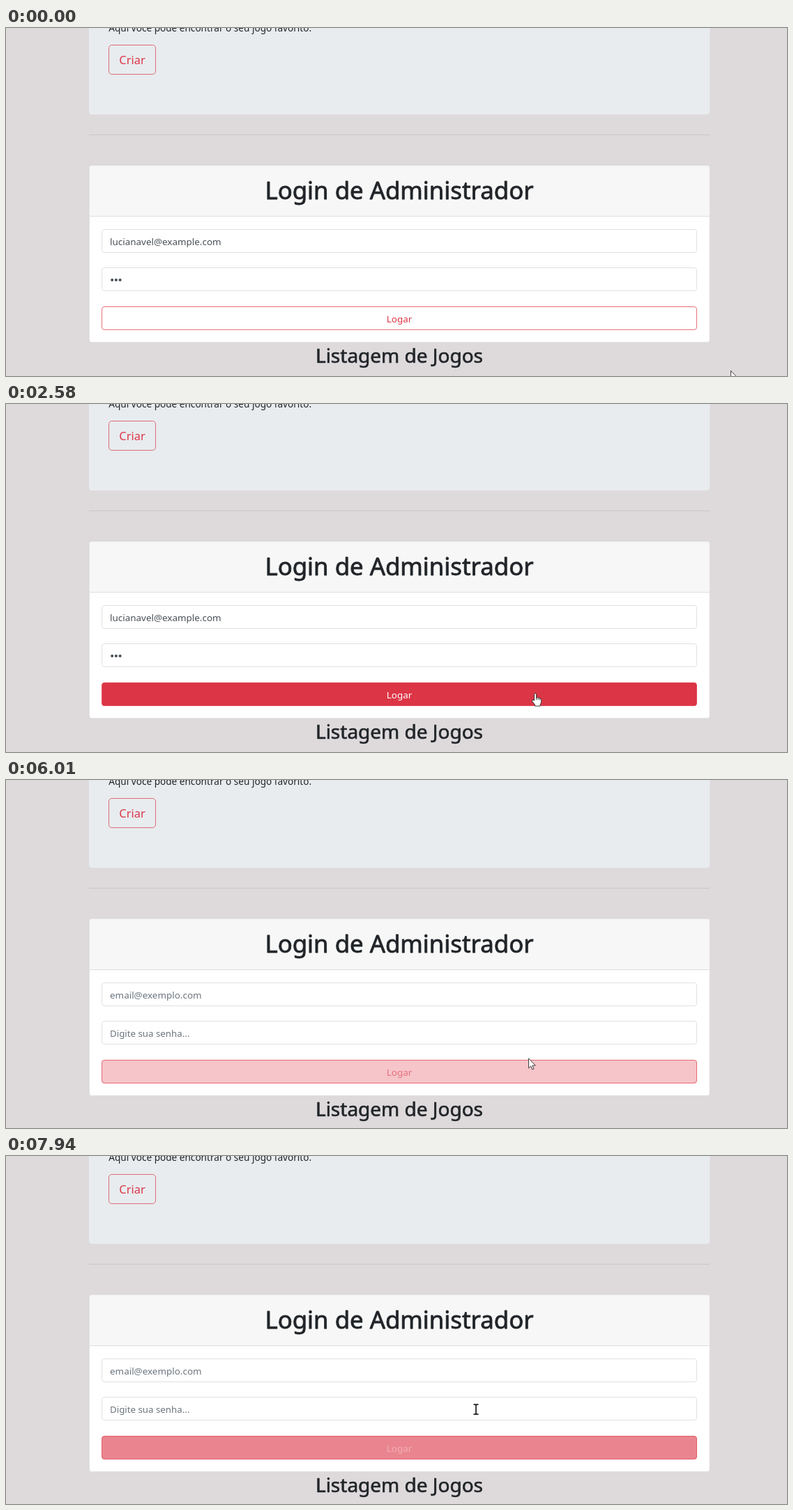
An HTML page with a canvas that plays this animation: 1120x500 px, repeating every 8000 ms.

```html
<!DOCTYPE html>
<html lang="pt-BR">
<head>
<meta charset="utf-8">
<title>Login de Administrador</title>
<style>
html, body { margin: 0; width: 100%; height: 100%; overflow: hidden; background: #dedadb; }
canvas { display: block; width: 1120px; height: 500px; }
</style>
</head>
<body>
<canvas id="stage" width="1120" height="500"></canvas>
<script>
const ctx = document.getElementById('stage').getContext('2d');
const LOOP = 8000, RELOAD = 5150;
const FONT = '"Noto Sans", "Open Sans", sans-serif';
const INK = '#212529', RED = '#dc3545';

const HAND = new Path2D('M-1.5 10.5V1.2Q0-.6 1.5 1.2V6.5Q3 5.5 4 7Q5.5 6 6.5 7.6Q8.5 7 8.6 9V12Q8.5 14.5 7 16.5V18.5H-.5V16.5L-4.6 11.6Q-5 9.5-3 9.8Z');
const FINGERS = new Path2D('M1.5 6.5V9.5M4 7V9.8M6.5 7.6V10');
const ARROW = new Path2D('M0 0V14L3.2 11L5.3 16L7.4 15.1L5.3 10.2H9.7Z');
const IBEAM = new Path2D('M-3.5-7H-1Q0-7 0-6Q0-7 1-7H3.5M0-6V6M-3.5 7H-1Q0 7 0 6Q0 7 1 7H3.5');

// Cursor hot spot: time, x, y
const CURSOR = [
  [70, 1039.5, 492.5], [480, 983, 475], [1090, 983, 475], [1260, 976, 471],
  [1570, 976, 471], [1940, 759, 415.5], [4600, 759, 415.5], [4760, 749, 417.5],
  [5770, 749, 417.5], [6010, 749.5, 400], [6320, 750, 386], [6690, 750, 386],
  [7240, 741.5, 415.5], [7540, 741.5, 415.5], [7725, 722, 401], [7940, 674, 364]
];

const clamp = v => Math.max(0, Math.min(1, v));
const lerp = (a, b, k) => a + (b - a) * k;
const easeInOut = k => k * k * (3 - 2 * k);
const fade = (t, start, end) => easeInOut(clamp((t - start) / (end - start)));

function cursorAt(t) {
  const next = CURSOR.findIndex(key => key[0] > t);
  if (next === 0) return CURSOR[0].slice(1);
  if (next < 0) return CURSOR[CURSOR.length - 1].slice(1);
  const a = CURSOR[next - 1], b = CURSOR[next];
  const k = (t - a[0]) / (b[0] - a[0]);
  return [lerp(a[1], b[1], k), lerp(a[2], b[2], k)];
}

function hoverAt(t) {
  if (t < RELOAD) return fade(t, 1805, 2305);
  if (t < 5960) return 0.32 * fade(t, 5770, 5960);
  if (t < 6600) return 0.32 * (1 - fade(t, 5960, 6220));
  return fade(t, 6985, 7485) * (1 - fade(t, 7725, 8225));
}

function box(x, y, w, h, r, fill, stroke, width = 0.7) {
  ctx.beginPath();
  ctx.roundRect(x, y, w, h, r);
  if (fill) { ctx.fillStyle = fill; ctx.fill(); }
  if (stroke) { ctx.strokeStyle = stroke; ctx.lineWidth = width; ctx.stroke(); }
}

function text(str, x, y, size, color, align = 'left', weight = 0) {
  ctx.font = `${size}px ${FONT}`;
  ctx.textAlign = align;
  ctx.fillStyle = color;
  ctx.fillText(str, x, y);
  if (weight) {
    ctx.lineJoin = 'round';
    ctx.lineWidth = weight;
    ctx.strokeStyle = color;
    ctx.strokeText(str, x, y);
  }
}

function drawFields(filled) {
  box(137.5, 289.5, 853, 33, 3.6, '#fff', '#ced4da');
  box(137.5, 344.5, 853, 33, 3.6, '#fff', '#ced4da');
  if (!filled) {
    text('email@exemplo.com', 149, 312, 13.45, '#6c757d');
    text('Digite sua senha...', 149, 367, 13.3, '#6c757d');
    return;
  }
  text('lucianavel@example.com', 149, 312, 13.45, '#495057');
  ctx.fillStyle = '#495057';
  for (let i = 0; i < 3; i++) {
    ctx.beginPath();
    ctx.arc(152.2 + i * 5.7, 362, 2.1, 0, Math.PI * 2);
    ctx.fill();
  }
}

function drawSubmit(hover, ring) {
  if (ring) box(135.6, 398.6, 856.8, 36.8, 5, null, `rgba(220,53,69,${0.5 * ring})`, 2.9);
  box(137.5, 400.5, 853, 33, 3.6, `rgba(220,53,69,${hover})`, RED);
  const mix = [220, 53, 69].map(c => Math.round(lerp(c, 255, hover)));
  text('Logar', 564, 423, 13.4, `rgb(${mix})`, 'center');
}

function drawPage(t) {
  box(119, -40, 890.3, 164.3, 4.3, '#e8ecef');
  text('Aqui você pode encontrar o seu jogo favorito.', 147.3, 5, 13.6, INK);
  box(147.5, 24.5, 67, 42, 4.3, null, RED);
  text('Criar', 181, 52.3, 16.4, RED, 'center');
  ctx.fillStyle = '#cbc7c8';
  ctx.fillRect(119, 153, 890, 1);

  box(119.5, 197.5, 889.5, 254, 3.6, '#fff', '#dfdfdf');
  box(120, 198, 888.5, 72, [3, 3, 0, 0], '#f7f7f7');
  ctx.fillStyle = '#dfdfdf';
  ctx.fillRect(120, 270, 888.5, 1);
  text('Login de Administrador', 564, 245.5, 34.8, INK, 'center', 0.8);
  drawFields(t < RELOAD);
  drawSubmit(hoverAt(t), t < RELOAD ? fade(t, 2730, 3520) : 0);
  text('Listagem de Jogos', 564, 481, 28, INK, 'center', 0.65);
}

function drawCursor(t, offset) {
  const [x, y] = cursorAt(t);
  const over = (top, bottom) => x > 137 && x < 991 && y > top + offset && y < bottom + offset;
  ctx.save();
  ctx.translate(x, y);
  ctx.lineJoin = 'round';
  ctx.lineWidth = 0.85;
  ctx.fillStyle = '#fff';
  ctx.strokeStyle = '#222';
  if (over(344, 378)) {
    ctx.strokeStyle = '#000';
    ctx.lineWidth = 1.5;
    ctx.stroke(IBEAM);
  } else {
    const hand = over(400, 434);
    const shape = hand ? HAND : ARROW;
    ctx.fill(shape);
    ctx.stroke(shape);
    if (hand) ctx.stroke(FINGERS);
  }
  ctx.restore();
}

function draw(t) {
  const offset = t < RELOAD ? 0 : 2;
  ctx.fillStyle = '#dedadb';
  ctx.fillRect(0, 0, 1120, 500);
  ctx.save();
  ctx.translate(0, offset);
  drawPage(t);
  ctx.restore();

  const status = fade(t, 4560, 4760) * (1 - fade(t, 5420, 5610));
  if (status) box(-4, 497, 375.5, 8, 3, `rgba(8,8,8,${status})`);
  drawCursor(t, offset);
}

const start = performance.now();
function tick() {
  draw((performance.now() - start) % LOOP);
  requestAnimationFrame(tick);
}
tick();
</script>
</body>
</html>
```
